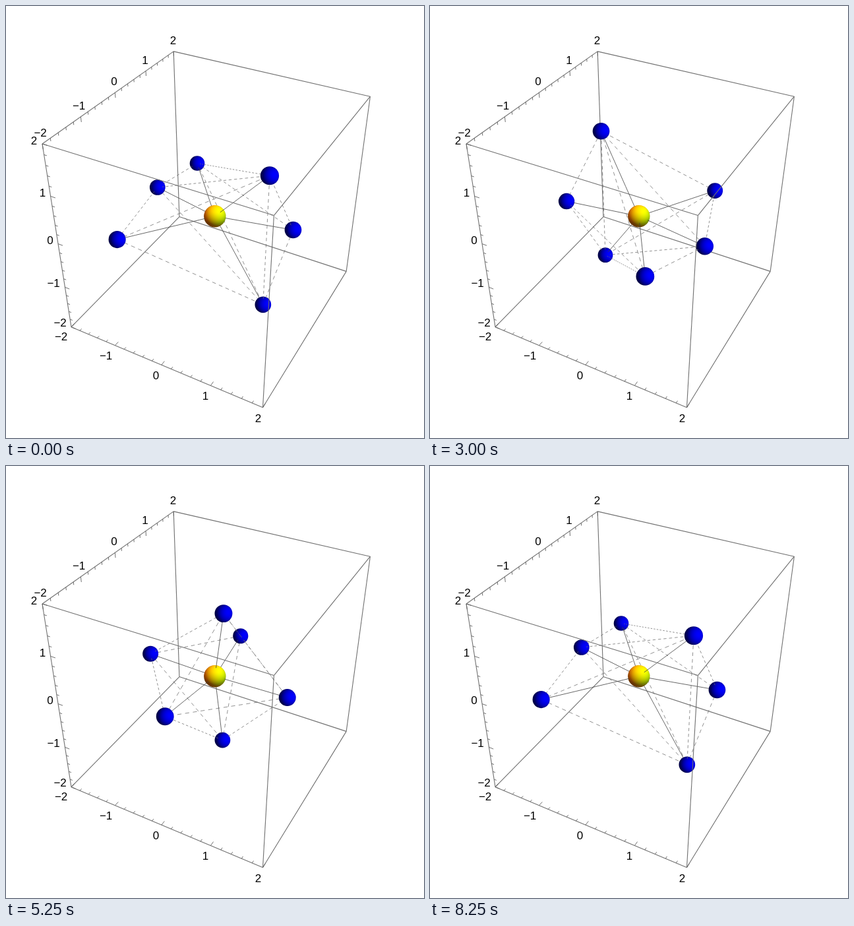
Animation of 634x655 px, one loop 9 s. Source, as an HTML page with a canvas:

```html
<!DOCTYPE html>
<html lang="en">
<head>
<meta charset="utf-8">
<title>Octahedral vibration</title>
<style>
  html, body { margin: 0; width: 100%; height: 100%; overflow: hidden; background: #fff; }
  canvas, svg { position: absolute; left: 0; top: 0; width: 634px; height: 655px; }
  text { font: 17px "Liberation Sans", Arial, sans-serif; text-anchor: middle; fill: #000; }
</style>
</head>
<body>
<canvas id="stage"></canvas>
<svg id="labels" viewBox="0 0 634 655"></svg>
<script>
const W = 634, H = 655, LOOP = 9000, STEP = 150;
const canvas = document.getElementById('stage');
const ctx = canvas.getContext('2d');
const dpr = window.devicePixelRatio || 1;
canvas.width = W * dpr;
canvas.height = H * dpr;

// Vector helpers
const dot = (a, b) => a[0] * b[0] + a[1] * b[1] + a[2] * b[2];
const mix = (a, b, u) => a.map((v, i) => v + (b[i] - v) * u);
const dist = (a, b) => Math.hypot(a[0] - b[0], a[1] - b[1], a[2] - b[2]);
const unit = a => a.map(v => v / Math.hypot(...a));
const cross = (a, b) => [
  a[1] * b[2] - a[2] * b[1], a[2] * b[0] - a[0] * b[2], a[0] * b[1] - a[1] * b[0]
];

// Perspective camera looking at the middle of the box
const eye = [5.2, -9.6, 8], focal = 1130, cx = 316.8, cy = 318.8;
const fwd = unit(eye.map(v => -v));
const right = unit(cross(fwd, [0, 0, 1]));
const up = cross(right, fwd);
const eyeDist = Math.hypot(...eye);

function project(p) {
  const depth = eyeDist + dot(fwd, p), k = focal / depth;
  return { x: cx + dot(right, p) * k, y: cy - dot(up, p) * k, depth, k };
}

function line(p, q, color, width) {
  const a = project(p), b = project(q);
  ctx.strokeStyle = color;
  ctx.lineWidth = width;
  ctx.beginPath();
  ctx.moveTo(a.x, a.y);
  ctx.lineTo(b.x, b.y);
  ctx.stroke();
}

// Box edges: those that meet in the far corner lie behind everything
const corner = i => [i & 1 ? 2 : -2, i & 2 ? 2 : -2, i & 4 ? 2 : -2];
const edges = [];
for (let i = 0; i < 8; i++)
  for (const bit of [1, 2, 4])
    if (!(i & bit)) edges.push([i, i | bit]);
const FAR = 2;
const backEdges = edges.filter(e => e.includes(FAR));
const frontEdges = edges.filter(e => !e.includes(FAR));
const drawEdges = list => list.forEach(([i, j]) => line(corner(i), corner(j), '#707070', 1.1));

// Axes: point on the edge, tick direction
const axes = [
  { at: v => [v, -2, -2], dir: [0, 1, 0] },
  { at: v => [-2, v, 2], dir: [0, 0, -1] },
  { at: v => [-2, -2, v], dir: [1, 0, 0] }
];
function drawTicks() {
  for (const { at, dir } of axes)
    for (let n = -10; n <= 10; n++) {
      const p = at(n / 5), len = n % 5 ? 0.055 : 0.1;
      line(p, p.map((v, i) => v + dir[i] * len), '#606060', 0.9);
    }
}

// Label centres for -2 .. 2 on each axis
const labelSpots = [
  [[83, 501], [151, 530], [227, 560], [302, 591], [382, 625]],
  [[51.5, 192], [110, 151], [163.5, 114], [210.5, 82], [253, 52]],
  [[81.5, 480], [71.5, 420], [66.5, 354.5], [55, 283], [42, 204]]
];
const svg = document.getElementById('labels');
for (const row of labelSpots)
  row.forEach(([x, y], i) => {
    const t = document.createElementNS('http://www.w3.org/2000/svg', 'text');
    t.setAttribute('x', x + 0.6);
    t.setAttribute('y', y + 6);
    t.textContent = String(i - 2).replace('-', '\u2212');
    svg.append(t);
  });

// Coloured lights in view space: x right, y up, z towards the viewer
const ambient = [0.4, 0.2, 0.2];
const lights = [
  { dir: [2, 0, 2], rgb: [0, 0.18, 0.5] },
  { dir: [2, 2, 3], rgb: [0.18, 0.5, 0.18] },
  { dir: [0, 2, 2], rgb: [0.5, 0.18, 0] },
  { dir: [0, 0, 2], rgb: [0, 0, 0.18] }
].map(l => ({ dir: unit(l.dir), rgb: l.rgb }));

function shadedBall(surface) {
  const size = 48, c = document.createElement('canvas');
  c.width = c.height = size;
  const g = c.getContext('2d'), img = g.createImageData(size, size);
  for (let i = 0; i < size * size; i++) {
    const x = (i % size + 0.5) * 2 / size - 1;
    const y = 1 - (Math.floor(i / size) + 0.5) * 2 / size;
    const n = unit([x, y, Math.sqrt(Math.max(0, 1 - x * x - y * y))]);
    surface.forEach((s, ch) => {
      const lit = lights.reduce((sum, l) => sum + l.rgb[ch] * Math.max(0, dot(n, l.dir)), ambient[ch]);
      img.data[i * 4 + ch] = 255 * s * lit;
    });
    img.data[i * 4 + 3] = 255;
  }
  g.putImageData(img, 0, 0);
  return c;
}
const yellowBall = shadedBall([1, 1, 0]);
const blueBall = shadedBall([0, 0, 1]);

function ball(p, radius, skin) {
  const { x, y, k } = project(p), r = radius * k;
  ctx.save();
  ctx.beginPath();
  ctx.arc(x, y, r, 0, 2 * Math.PI);
  ctx.clip();
  ctx.drawImage(skin, x - r - 0.5, y - r - 0.5, 2 * r + 1, 2 * r + 1);
  ctx.restore();
}

// Atoms: rest place and displacement of the vibration
const A = Math.SQRT2, DX = 1.17, DY = 0.3;
const atoms = [
  { rest: [-A, 0, 0], move: [0, DY, 0] },
  { rest: [A, 0, 0], move: [0, DY, 0] },
  { rest: [0, -A, 0], move: [-DX, 0, 0] },
  { rest: [0, A, 0], move: [-DX, 0, 0] },
  { rest: [0, 0, -A], move: [DX, -DY, 0] },
  { rest: [0, 0, A], move: [DX, -DY, 0] }
];
const CORE = 0.2, ATOM = 0.15, FLIP = 0.708;

// Edges of the convex hull; one of them flips when the shape is bent far enough
function hullEdges(s) {
  const list = [];
  for (let i = 0; i < 6; i++)
    for (let j = i + 1; j < 6; j++) {
      const opposite = i >> 1 === j >> 1;
      const sunk = s > FLIP && i === 1 && j === 2 || s < -FLIP && i === 0 && j === 3;
      if (!opposite && !sunk) list.push([i, j]);
    }
  if (Math.abs(s) > FLIP) list.push([4, 5]);
  return list;
}

// Cut a line into pieces of a given length and pitch, each with its own depth
function pieces(p, q, r1, r2, len, pitch, color, width) {
  const L = dist(p, q), out = [];
  for (let u = 0; u < L - r2; u += pitch) {
    const from = Math.max(u, r1), to = Math.min(u + len, L - r2);
    if (to <= from) continue;
    const a = mix(p, q, from / L), b = mix(p, q, to / L);
    out.push({
      depth: project(mix(a, b, 0.5)).depth,
      draw: () => line(a, b, color, width)
    });
  }
  return out;
}

// Two stepped periods around the middle of the run, at rest before and after
const MIDDLE = 25.5, PERIOD = 24.6;
function swing(ms) {
  const step = Math.floor(ms / STEP) - 4;
  const turns = Math.min(1, Math.max(-1, (step - MIDDLE) / PERIOD));
  return Math.cos(2 * Math.PI * turns);
}

function render(ms) {
  const s = swing(ms), origin = [0, 0, 0];
  const pts = atoms.map(a => a.rest.map((v, i) => v + a.move[i] * s));
  const items = [{ depth: eyeDist, draw: () => ball(origin, CORE, yellowBall) }];
  for (const p of pts) {
    items.push({ depth: project(p).depth, draw: () => ball(p, ATOM, blueBall) });
    items.push(...pieces(origin, p, CORE, ATOM, 0.3, 0.3, '#404040', 0.8));
  }
  for (const [i, j] of hullEdges(s))
    items.push(...pieces(pts[i], pts[j], ATOM, ATOM, 0.072, 0.135, '#6c6c6c', 0.75));
  items.sort((a, b) => b.depth - a.depth);

  ctx.setTransform(dpr, 0, 0, dpr, 0, 0);
  ctx.fillStyle = '#fff';
  ctx.fillRect(0, 0, W, H);
  drawEdges(backEdges);
  items.forEach(it => it.draw());
  drawEdges(frontEdges);
  drawTicks();
}

function tick() {
  render(performance.now() % LOOP);
  requestAnimationFrame(tick);
}
tick();
</script>
</body>
</html>
```
